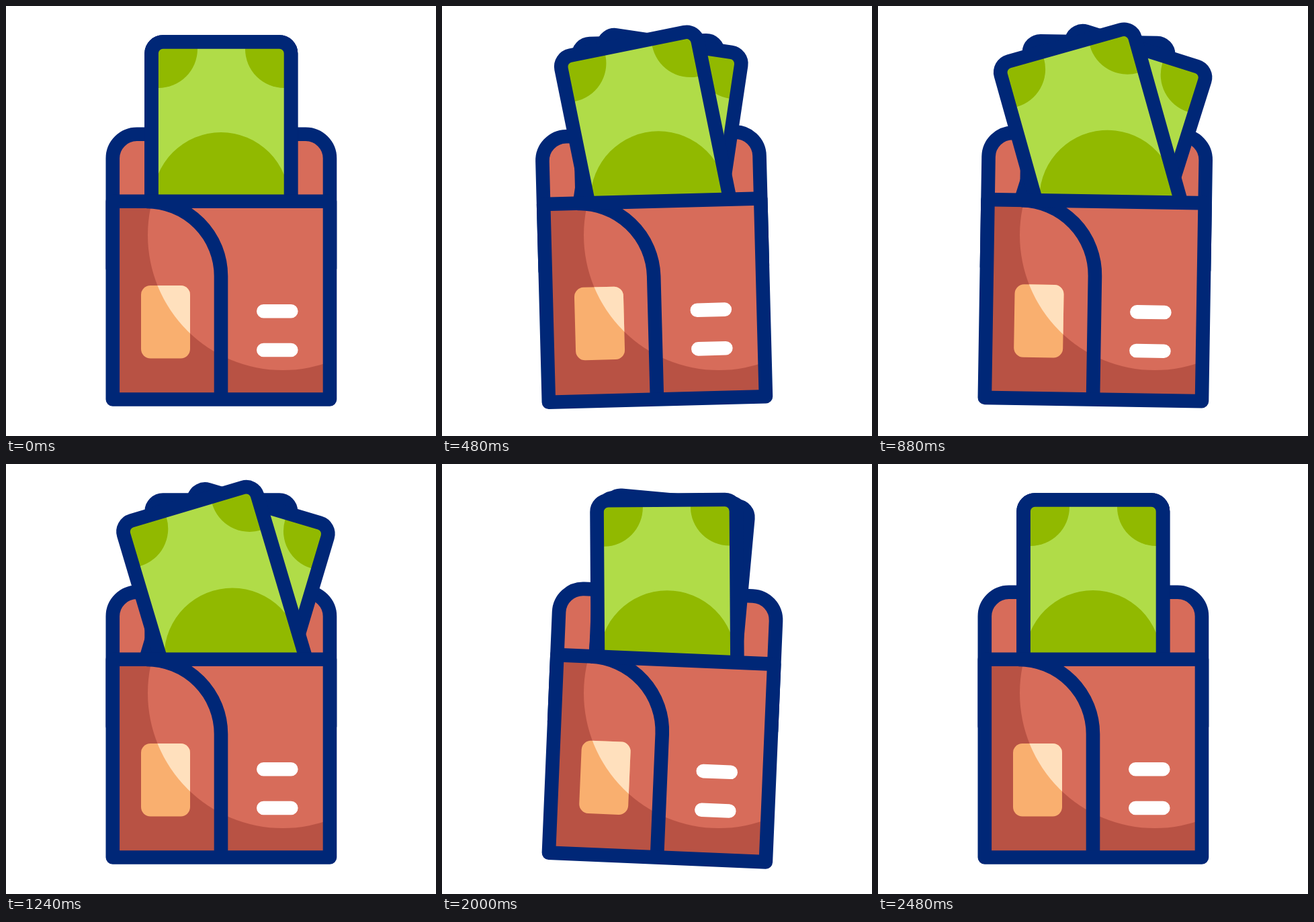
An HTML page with a canvas for the animation above (2640 ms loop, 640 px wide and 640 px high).

```html
<!DOCTYPE html>
<html lang="en">
<head>
<meta charset="utf-8">
<title>Wallet</title>
<style>
html, body { margin: 0; width: 100%; height: 100%; overflow: hidden; background: #fff; }
canvas { display: block; width: 100vmin; height: 100vmin; }
</style>
</head>
<body>
<canvas id="stage" width="640" height="640"></canvas>
<script>
const ctx = document.getElementById('stage').getContext('2d');
const LOOP = 2640, STEP = 40, LINE = 20.6;
const NAVY = '#002777', RED = '#d76c5a', DARK_RED = '#b85244';
const GREEN = '#b0dc48', DARK_GREEN = '#91b900';

// Keys are [time, value, slope]; a missing slope means a turning point.
const swing = [[0, 0], [310, 2.1], [620, -4.2], [930, 1.3], [1240, 0],
  [1490, 0], [1805, -3.05], [2120, 5.05], [2200, 3.98, -0.0145], [2480, 0], [LOOP, 0]];
const fan = [[0, 0], [270, 0], [640, 16.6], [1745, 16.6], [2090, 0], [LOOP, 0]];

function valueAt(keys, t) {
  const i = keys.findIndex(k => k[0] > t);
  const [t0, v0, m0 = 0] = keys[i - 1], [t1, v1, m1 = 0] = keys[i];
  const d = t1 - t0, u = (t - t0) / d, s = u * u * (3 - 2 * u);
  return v0 + (v1 - v0) * s + d * u * (1 - u) * (m0 * (1 - u) - m1 * u);
}

function shape(build) {
  const path = new Path2D();
  build(path);
  return path;
}
const disc = (x, y, r) => shape(p => p.arc(x, y, r, 0, 7));
const box = (x, y, w, h, r) => shape(p => p.roundRect(x, y, w, h, r));

const card = box(216.6, 53.5, 207.4, 330, 17);
const cardMarks = [disc(227, 64, 58), disc(414, 64, 58), disc(320, 289.5, 101.4)];
const back = box(158.8, 190.8, 323.2, 200, [36, 36, 0, 0]);
const front = box(158.8, 290.7, 323.2, 294.8, 0);
const patch = box(201, 416, 73, 108.5, 14);
const highlight = disc(412, 341, 201);
const flap = shape(p => {
  p.arc(209, 402, 111, -Math.PI / 2, 0);
  p.lineTo(320, 585);
});
const dashes = shape(p => {
  for (const y of [454.3, 512]) {
    p.moveTo(383.3, y);
    p.lineTo(424.3, y);
  }
});

function fill(path, color) {
  ctx.fillStyle = color;
  ctx.fill(path);
}

function stroke(path, color = NAVY) {
  ctx.strokeStyle = color;
  ctx.stroke(path);
}

function turn(degrees, x, y) {
  ctx.translate(x, y);
  ctx.rotate(degrees * Math.PI / 180);
  ctx.translate(-x, -y);
}

function drawCard(angle, x, y) {
  ctx.save();
  turn(angle, x, y);
  fill(card, GREEN);
  ctx.save();
  ctx.clip(card);
  cardMarks.forEach(mark => fill(mark, DARK_GREEN));
  ctx.restore();
  stroke(card);
  ctx.restore();
}

// The highlight stays still on the stage while the wallet swings under it.
function drawLit(path, shade, light) {
  fill(path, shade);
  ctx.save();
  ctx.clip(path);
  ctx.resetTransform();
  fill(highlight, light);
  ctx.restore();
}

function draw(t) {
  const spread = valueAt(fan, t);
  ctx.clearRect(0, 0, 640, 640);
  ctx.save();
  ctx.lineWidth = LINE;
  ctx.lineJoin = 'round';
  turn(valueAt(swing, t), 320, 585);

  fill(back, RED);
  stroke(back);
  drawCard(0, 320, 277);
  drawCard(spread, 320, 277);
  drawCard(-spread, 316, 230);

  drawLit(front, DARK_RED, RED);
  drawLit(patch, '#f9af6f', '#ffe0bd');
  stroke(flap);
  stroke(front);
  ctx.lineCap = 'round';
  stroke(dashes, '#fff');
  ctx.restore();
}

function tick() {
  const t = performance.now() % LOOP;
  draw(t - t % STEP);
  requestAnimationFrame(tick);
}
tick();
</script>
</body>
</html>
```
